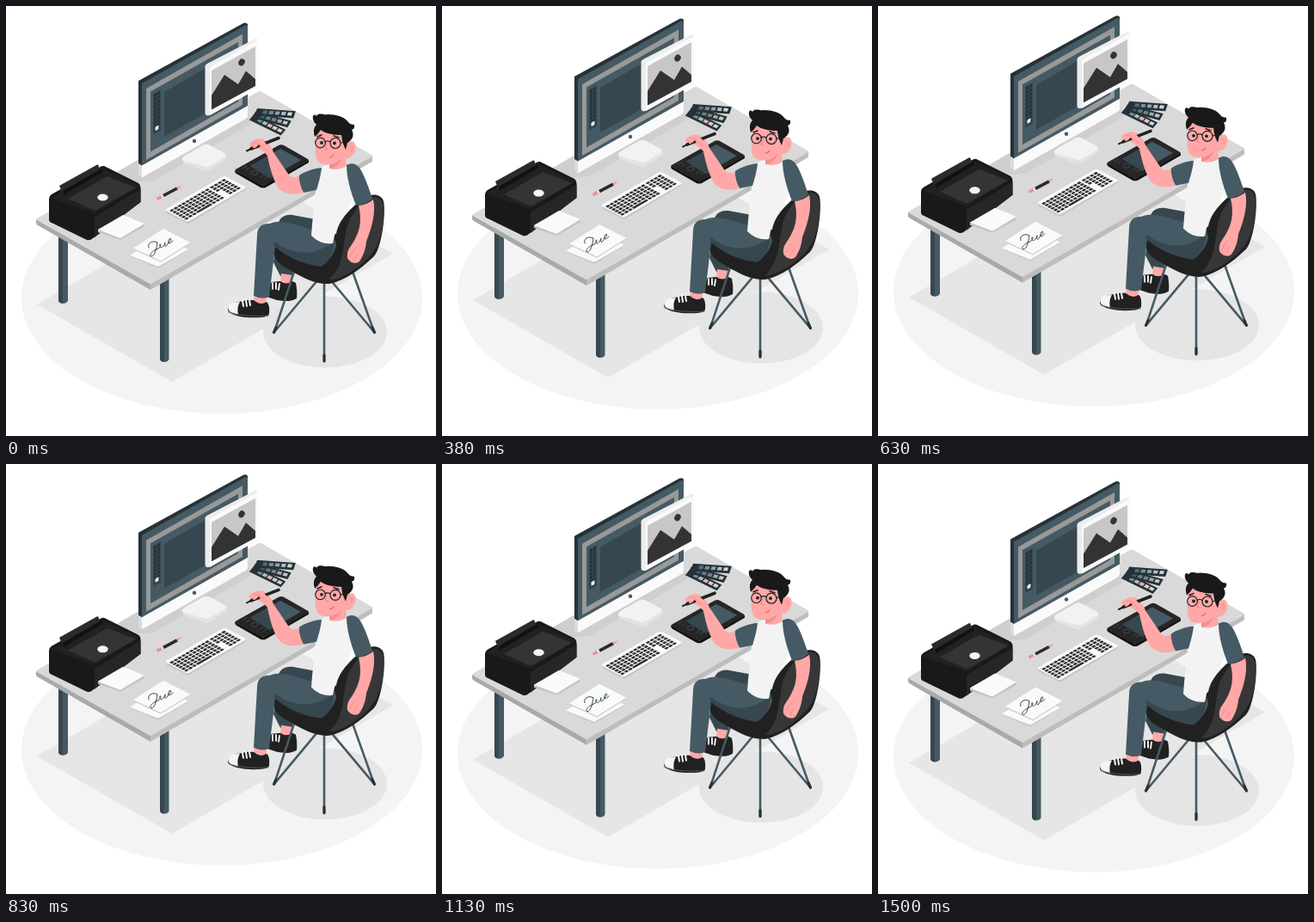
An HTML page for the animation above (1540 ms loop, 500x500 px).

```html
<!DOCTYPE html>
<html lang="en">
<head>
<meta charset="utf-8">
<title>Designer at work</title>
<style>
html, body { margin: 0; width: 100%; height: 100%; overflow: hidden; background: #fff; }
svg { display: block; width: 100%; height: 100%; }
.line { fill: none; stroke-linecap: round; stroke-linejoin: round; }
.slate { fill: #455a64; }
.deep { fill: #37474f; }
.ink { fill: #212121; }
.skin { fill: #ffa8a7; }
.paper { fill: #fafafa; }
</style>
</head>
<body>
<svg viewBox="0 0 500 500">
<g id="scene">
  <!-- floor -->
  <ellipse cx="251" cy="339.5" rx="233" ry="134.5" fill="#f4f4f4"/>
  <path d="M36 347L193 437L450 288L292 198Z" fill="#e6e6e6"/>
  <ellipse cx="371" cy="379" rx="72" ry="41.5" fill="#e5e5e5"/>

  <!-- desk -->
  <path class="deep" d="M61 262H66.500V346Q62 346 61 343ZM179 314H184V414Q180 414 179 411Z"/>
  <path class="slate" d="M66 262H72V343Q70 346 66 346ZM184 314H189.500V411Q188 414 184 414Z"/>
  <path d="M35 248L168 323V330L37 255Q35 254 35 252Z" fill="#a9a9a9"/>
  <path d="M168 323L426 174V180Q426 181 424 182L168 330Z" fill="#bdbdbd"/>
  <path d="M36 247L293 99.500Q295 98.500 297 99.500L425 173Q427 174 425 175.500L168 323.500L36 249Q35 248 36 247Z" fill="#d9d9d9"/>
  <path d="M129 193L155 178L281 124L285 137L172 203L150 205Z" fill="#cfcfcf"/>

  <!-- monitor -->
  <path d="M205 178Q205 176 208 174L229 162Q233 160 237 162L254 171Q257 173 257 178L237 191Q233 193 229 191L207 183Q205 181 205 178Z" fill="#e3e3e3"/>
  <path d="M205 178Q205 176 208 174L229 162Q233 160 237 162L254 171Q258 174 254 176L237 186Q233 188 229 186L207 180Q205 179 205 178Z" fill="#f2f2f2"/>
  <path d="M154 87L276 20Q279 18.500 281 21V118L158 187L154 184Z" fill="#263238"/>
  <path class="slate" d="M158 90L278 22.500Q281 21 281 25V117L158 186Z"/>
  <path d="M154 183L158 185.500V199.500L154 196.500Z" fill="#dcdcdc"/>
  <path d="M158 185.500L281 116V128Q281 130 279 131L158 199.500Z" fill="#fafafa"/>
  <path d="M163 96L275 32.500V115L163 179Z" fill="#999"/>
  <path class="slate" d="M168 99.500L270 42V111L168 169.500Z"/>
  <path class="deep" d="M184 100L260 56V109L184 152Z"/>
  <path d="M171 102L180 97V145L171 150Z" fill="#37474f"/>
  <g id="tools" transform="matrix(1 -.56 0 1 172 103)"></g>
  <circle cx="219" cy="157" r="2.200" class="slate"/>

  <!-- floating picture -->
  <path d="M231.500 70Q232 68 234 67L289 38.500Q293 37 293 41V95L238 126.500Q232 129 231.500 124Z" fill="#ededed"/>
  <path d="M237 71L293 40V96L237 127Z" fill="#fafafa"/>
  <path d="M239 75L290 47V93L239 120.500Z" fill="#c7c7c7"/>
  <path d="M239 104L254 80L270 91L279 75.500L290 85V93L239 120.500Z" fill="#333"/>
  <ellipse cx="274" cy="65.500" rx="3.500" ry="4.200" fill="#333" transform="rotate(30 274 65.500)"/>

  <!-- printer -->
  <path d="M50 224Q50 221 53 219L110 187Q113 185 116 187L154 206Q156.500 208 156.500 211V228L101 270Q98 273 94 272L53 252Q50 251 50 248Z" fill="#191919"/>
  <path d="M103 245L156.500 213V228L103 269Z" fill="#262626"/>
  <path d="M52 223L112 189L155 209L103 241Z" fill="#212121"/>
  <path d="M62 209L106 184.500Q108 184 108 187L111 193L66 219Z" fill="#2b2b2b"/>
  <path d="M66 215L111 189L112 193L67 220Z" fill="#111"/>
  <path d="M72 224L116 199Q118 198 120 199L151 211L107 236Q104 238 101 237Z" fill="#343434"/>
  <ellipse cx="112.500" cy="222.500" rx="6.200" ry="4" fill="#f3f3f3"/>
  <path d="M107 260L136 244L161 253L160 257L133 272L107 263Z" fill="#c4c4c4"/>
  <path class="paper" d="M107 260L136 243L161 253L133 270Z"/>

  <!-- sheets -->
  <path d="M144 291L180 268L212 284L177 305Z" fill="#c9c9c9"/>
  <path class="paper" d="M144 290L180 267L212 283L177 303Z"/>
  <path d="M148 283L184 260L215 276L180 298Z" fill="#cecece"/>
  <path class="paper" d="M148 281.500L183 259L214.500 275L180 296.500Z"/>
  <path class="line" d="M166 281C164 276 170 272 176 275C175 282 173 291 169 291C165 290 171 284 177 282C181 280 180 276 179 277C178 283 183 282 185 275C184 281 186 281 189 275C193 272 192 269 190 271C187 276 190 278 194 273" stroke="#37474f"/>

  <!-- pencil -->
  <g class="line" stroke-width="3.600" style="stroke-linecap:butt">
    <path d="M175.500 224.500L181 221.500" stroke="#f28f8f"/>
    <path d="M181 221.500L183 220.500" stroke="#eee"/>
    <path d="M183 220.500L199 212" stroke="#2b2b2b"/>
  </g>
  <path d="M198 210.500L204.500 208.500L200 213.500Z" fill="#f0a09c"/>

  <!-- keyboard -->
  <path d="M187 238L254 198.500L278 211V214L212 253L187 241Z" fill="#c4c4c4"/>
  <path class="paper" d="M186 237Q186 236 188 235L252 198.500Q254 197.500 256 198.500L278 210Q279 211 278 212L213 250Q211 251 209 250L188 239Q186 238 186 237Z"/>
  <g id="keys" transform="matrix(4.550 -2.640 3.400 1.880 190 238)" fill="#2f2f2f"></g>

  <!-- swatches -->
  <g id="swatches"></g>

  <!-- tablet -->
  <path d="M266 191L299 209L352 179V182L302 211Q299 212 296 211L268 195Q266 194 266 191Z" fill="#111"/>
  <path d="M267 190L317 162Q320 160.500 323 162L351 178Q353 180 350 181L302 208Q299 210 296 208L267 192Q266 191 267 190Z" fill="#262626"/>
  <path class="slate" d="M284 186L319 166L343 179L307 200Z"/>
  <path class="deep" d="M284 186L302 176L326 189L307 200Z"/>
  <g class="line" stroke="#484848">
    <ellipse cx="289" cy="194" rx="4" ry="2.500"/>
    <path d="M275 189L280 186M279 191L283 188.500M296 199L300 196.500M300 201L304 198.500"/>
  </g>

  <!-- far leg and shoe -->
  <path class="deep" d="M316 258C316 247 323 242 333 243L360 248L372 280L334 290L333 314H319L311 298Z"/>
  <path class="skin" d="M320 311L333 313V324Q326 328 319 322Z"/>
  <path class="ink" d="M303 334C308 332 306 323 309 321L319 320Q326 325 333 320L337 322Q339 332 338 340Q331 345 315 342L303 338Z"/>
  <path class="line" d="M310 322V329M314 322V329M318 323L317 330" stroke="#fff" stroke-width="1.800"/>

  <!-- chair frame -->
  <g class="line" stroke="#455a64" stroke-width="2.600">
    <path d="M335 309L312 379L363 318M370 318V412M376 317L428 379L402 306"/>
    <path d="M314 374L311.500 379.500M370 406V413M426 374L428.500 379.500" stroke="#263238" stroke-width="3.200"/>
  </g>

  <!-- near leg and shoe -->
  <path class="skin" d="M289 333L304 335L302 346Q295 351 288 344Z"/>
  <path class="ink" d="M258 351C261 343 272 345 279 342L288 342Q296 349 303 344Q307 347 306 358Q305 361 297 362C283 363 263 362 258 354Z"/>
  <path d="M258 351C260 343 268 345 272 344Q268 351 270 359Q259 358 258 351Z" fill="#f5f5f5"/>
  <path class="line" d="M275 343L276 349M279 342L280 349M283 342L284 348" stroke="#fff" stroke-width="1.900"/>
  <path class="line" d="M259 356Q276 362 305 360" stroke="#455a64"/>

  <!-- chair shell -->
  <path d="M312 279C310 292 314 299 330 307C345 316 360 324 376 323C395 319 411 307 428 291C437 281 442 240 439 227C437 219 425 217 417 223C404 232 387 247 384 265L350 262L316 274Z" fill="#212121"/>
  <path d="M424 223C435 219 440 227 439 241C438 272 430 287 410 303C396 314 382 319 376 318C392 302 391 286 395 263C398 246 409 230 424 223Z" fill="#373737"/>
  <path class="slate" d="M292 267C292 257 297 253 307 253C322 246 347 259 381 267L384 278Q380 295 366 300C342 298 325 289 313 280L306 338Q298 342 288 337Z"/>
  <path class="deep" d="M313 280Q310 277 313 274C325 285 351 293 371 280L382 275Q379 297 366 303C342 300 325 290 313 280Z"/>

  <!-- body -->
  <path d="M363 189C374 183 389 180 399 187C407 203 405 221 400 231C391 243 384 255 380 276Q366 278 355 267C356 248 359 231 360 214Z" fill="#f3f3f3"/>
  <path class="slate" d="M367 188C357 189 346 193 341 197Q340 207 346 217L361 214C364 204 366 197 367 188Z"/>
  <path class="slate" d="M396 185C410 178 415 192 426 224Q418 231 407 232C401 217 396 200 396 185Z"/>
  <path class="skin" d="M410 232Q420 231 427 225C431 243 423 263 419 274C418 284 415 291 411 297C407 301 399 298 397 293C396 284 400 281 403 276C412 262 414 249 410 232Z"/>
  <path class="line" d="M400 292Q402 285 407 281M405 295L409 288" stroke="#e88b8b" stroke-width=".8"/>

  <!-- drawing arm and pen -->
  <path class="skin" d="M341 197Q336 201 330 198L311 170Q309 163 303 158C298 152 288 154 283 160Q282 165 289 165Q296 165 304 174C307 190 312 205 317 212Q327 222 346 217Q340 207 341 197Z"/>
  <path class="line" d="M285 166L317 153.500" stroke="#212121" stroke-width="3.600"/>
  <path class="line" d="M280 168.500L286 165.500" stroke="#212121" stroke-width="2"/>
  <path class="skin" d="M288 159Q290 155 295 155Q302 157 306 166L299 169L294 161Q290 166 287 165Z"/>
  <path class="line" d="M288 159Q293 157 297 162L303 168" stroke="#e88b8b" stroke-width=".7"/>

  <!-- head -->
  <path class="skin" d="M361 147C360 158 358 175 363 181Q367 185 376 184V189Q387 192 396 186L395 177C405 178 410 163 404 158Q400 156 397 160L392 144L370 141Z"/>
  <path d="M376 184Q386 183 391 176Q386 189 376 189Z" fill="#f28f8f"/>
  <path d="M359 152C357 145 358 141 361 138C354 132 357 123 361 128C364 123 369 127 374 126C384 126 394 129 398 135Q400 138 405 138Q406 143 402 144C405 149 404 155 397 159L395 167Q391 160 390 150C380 150 371 148 366 144Q363 149 359 152Z" fill="#191919"/>
  <path class="line" d="M400 163Q404 161 402 168" stroke="#e88b8b"/>
  <g class="line" stroke="#212121" stroke-width="1.200">
    <circle cx="365.500" cy="159" r="5.800"/>
    <circle cx="383" cy="159.500" r="6"/>
    <path d="M371 158Q374 156 377 158M389 159L398 158"/>
    <path d="M362 152L367 150M381 151L387 153" stroke-width="1.500"/>
  </g>
  <circle class="ink" cx="367" cy="159" r="1.900"/>
  <circle class="ink" cx="382" cy="159.500" r="1.900"/>
  <path class="line" d="M373 160L371 166L374 167" stroke="#f07f80"/>
  <path class="line" d="M376 176Q379 176 381 173" stroke="#d86a70" stroke-width="1.200"/>
</g>
</svg>
<script>
const byId = id => document.getElementById(id);
const rect = (x, y, w, h, fill) =>
  `<rect x="${x}" y="${y}" width="${w}" height="${h}"${fill ? ` fill="${fill}"` : ''}/>`;

let tools = '';
for (let row = 0; row < 10; row++)
  for (let col = 0; col < 2; col++)
    tools += rect(col * 4, row * 4.5, 3, 3.3, '#263238');
byId('tools').innerHTML = tools + rect(1.5, 38.5, 4, 4.5, '#eee');

let keys = '';
for (let row = 0; row < 6; row++) {
  for (let col = 0; col < 14; col++) {
    if (col === 10 && row > 2) continue;
    if (row === 5 && col > 2 && col < 7) continue;
    keys += rect(col + (col > 9 ? .25 : 0), row, .75, .72);
  }
}
byId('keys').innerHTML = keys + rect(3, 5, 3.75, .72);

const shades = [
  ['#546e7a', '#78909c', '#90a4ae', '#b0bec5', '#cfd8dc'],
  ['#455a64', '#607d8b', '#808080', '#a6a6a6', '#c7c7c7'],
  ['#78909c', '#b0bec5', '#d9b5b8', '#f0c4c6', '#cfd8dc']
];
byId('swatches').innerHTML = shades.map((strip, i) =>
  `<g transform="translate(${292 - i * 1.8} ${119 + i * 3.4}) rotate(${4 + i * 11}) skewX(-14)">` +
  rect(0, 0, 45 - i * 2, 8.5, '#263238') +
  strip.map((fill, j) => rect(8 + j * (7.2 - i * .4), 2, 5, 3.8, fill)).join('') + '</g>'
).reverse().join('');

const PERIOD = 1540, LIFT = 10, LEAD = 78;
const scene = byId('scene');
const height = time => LIFT * (1 - Math.abs(1 - 2 * ((time + LEAD) % PERIOD) / PERIOD));
const start = performance.now();

function draw() {
  const time = Math.max(0, performance.now() - start);
  scene.setAttribute('transform', `translate(0 ${height(0) - height(time)})`);
  requestAnimationFrame(draw);
}
draw();
</script>
</body>
</html>
```
